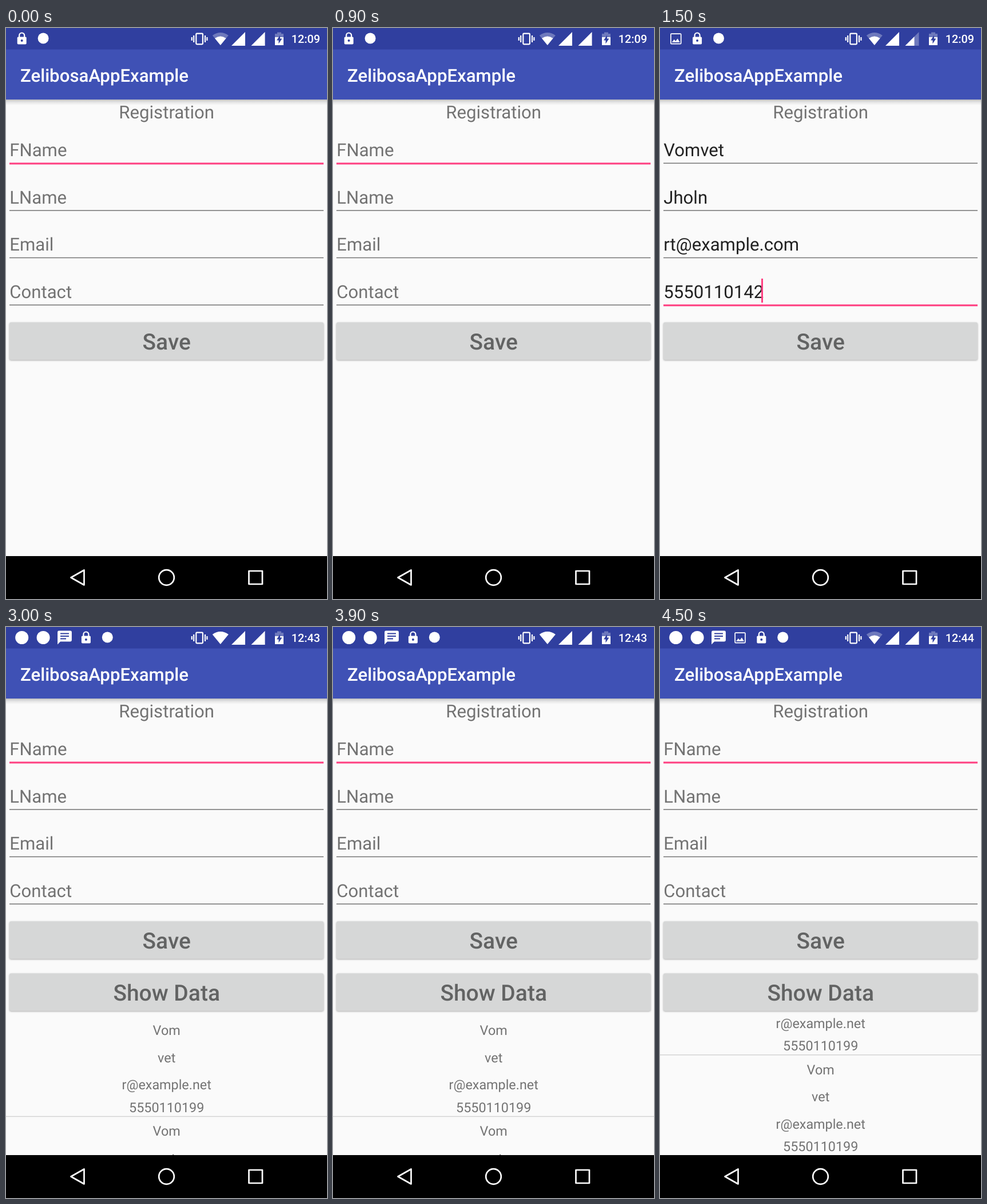
Animation of 561x998 px, one loop 6000 ms. Source, as an HTML page:

```html
<!DOCTYPE html>
<html lang="en">
<head>
<meta charset="utf-8">
<title>Registration form</title>
<style>
html, body { margin: 0; width: 100%; height: 100%; overflow: hidden; background: #fafafa; }
svg { display: block; width: 100vw; height: 100vh; }
text { font: 31.17px Roboto, sans-serif; fill: #737373; text-rendering: geometricPrecision; }
.mid { text-anchor: middle; }
.title { font-weight: 500; fill: #fff; }
.clock { font-size: 19.8px; font-weight: 500; fill: #fff; text-anchor: end; }
.button text { font-size: 38.96px; font-weight: 500; fill: #626363; text-anchor: middle; }
.button rect { fill: #d6d7d7; filter: drop-shadow(0 1.5px 1.5px rgba(0,0,0,.32)); }
.row text { font-size: 23.37px; text-anchor: middle; }
.typed { fill: #212121; }
.dim { fill: #fff; opacity: .3; }
</style>
</head>
<body>
<svg viewBox="0 0 561 998">
  <defs>
    <linearGradient id="shade" x2="0" y2="1">
      <stop offset="0" stop-opacity=".27"/>
      <stop offset=".45" stop-opacity=".1"/>
      <stop offset="1" stop-opacity="0"/>
    </linearGradient>
    <clipPath id="listArea"><path d="M0 677H561V923H0Z"/></clipPath>

    <g id="lock">
      <path d="M-4.5 17v-4a4.5 4.5 0 0 1 9 0v4" fill="none" stroke="#fff" stroke-width="2.2"/>
      <rect x="-8" y="15.5" width="16" height="13" rx="1.8" fill="#fff"/>
      <circle cy="22" r="2" fill="#303f9f"/>
    </g>
    <g id="photo">
      <rect x="-8.8" y="10.2" width="17.8" height="17.4" rx="1" fill="none" stroke="#fff" stroke-width="1.7"/>
      <path d="M-7 25l4-5 2.7 3 3.3-4.4L7 25Z" fill="#fff"/>
    </g>
    <g id="chat">
      <path d="M-10-12H10a2.4 2.4 0 0 1 2.4 2.4V4.600a2.400 2.400 0 0 1-2.400 2.400H-7.500L-12.400 12V-9.600A2.400 2.400 0 0 1-10-12Z" transform="translate(0 18.500)" fill="#fff"/>
      <path d="M-7.500 11.500H7.500M-7.500 16H7.500M-7.500 20.500H2.500" stroke="#303f9f" stroke-width="2.200"/>
    </g>
    <circle id="dot" cy="18" r="9.5" fill="#fff"/>
    <circle id="disc" cy="18.500" r="11.500" fill="#fff"/>
    <path id="fan" d="M0 0L-14-17Q0-27 14-17Z"/>
  </defs>

  <path d="M0 0H561V998H0Z" fill="#fafafa"/>
  <rect y="124" width="561" height="11" fill="url(#shade)"/>
  <path d="M0 0H561V125H0Z" fill="#3f51b5"/>
  <path d="M0 0H561V37.5H0Z" fill="#303f9f"/>
  <text class="title" x="25" y="93.700">ZelibosaAppExample</text>

  <g id="icons"></g>
  <g fill="none" stroke="#fff" stroke-width="2.2">
    <rect x="332.300" y="9.600" width="11.600" height="18.800" rx="1.300"/>
    <path d="M328.200 13V25M324.800 16V22M348 13V25M351.400 16V22"/>
  </g>
  <g transform="translate(374.800 30)">
    <use href="#fan" class="dim"/>
    <use href="#fan" id="wifi" fill="#fff"/>
  </g>
  <path d="M394 31L418 7V31Z" fill="#fff"/>
  <path class="dim" d="M428.500 31L452.500 7V31Z"/>
  <path id="signal" fill="#fff"/>
  <path class="dim" d="M470 10H474V7.500H481V10H485V16H470Z"/>
  <path d="M470 16H485V30H470Z" fill="#fff"/>
  <path d="M479 12.500L473 21.500H476.500V27.500L482.500 18.500H479Z" fill="#303f9f"/>
  <text class="clock" id="clock" x="549" y="26"></text>

  <text class="mid" x="280.700" y="158.300">Registration</text>
  <g id="fields"></g>
  <g class="button">
    <rect x="6" y="514.500" width="549" height="65.500" rx="3"/>
    <text x="280.700" y="562">Save</text>
  </g>
  <g id="data">
    <g class="button">
      <rect x="6" y="605.500" width="549" height="65.500" rx="3"/>
      <text x="280.700" y="653">Show Data</text>
    </g>
    <g clip-path="url(#listArea)"><g id="list"></g></g>
  </g>

  <path d="M0 923H561V998H0Z"/>
  <g fill="none" stroke="#fff" stroke-width="2.700" stroke-linejoin="round">
    <path d="M113.500 960.500L136.500 947.500V973.500Z"/>
    <circle cx="280.500" cy="960.500" r="13.300"/>
    <rect x="424.500" y="949" width="23.500" height="23"/>
  </g>
</svg>

<script>
const $ = id => document.getElementById(id);
const HOLD = 1500;
const PINK = '#ff4081';
const hints = ['FName', 'LName', 'Email', 'Contact'];
const typed = ['Vomvet', 'Jholn', 'rt@example.com', '5550110142'];
const record = [['Vom', 713.3], ['vet', 760.6], ['r@example.net', 808.2], ['5550110199', 848]];

const states = [
  { icons: 'lock dot', clock: '12:09' },
  { icons: 'photo lock dot', clock: '12:09', filled: true, weak: true },
  { icons: 'disc disc chat lock dot', clock: '12:43', data: true, fullWifi: true },
  { icons: 'disc disc chat photo lock dot', clock: '12:44', data: true, scroll: 107.6 }
];

function drawField(hint, i, filled) {
  const y = 82.6 * i;
  const active = i === (filled ? 3 : 0);
  const line = active
    ? `<rect x="6" y="${235.4 + y}" width="549" height="3.1" fill="${PINK}"/>`
    : `<rect x="6" y="${235.6 + y}" width="549" height="1.5" fill="#737373"/>`;
  const cursor = filled && active
    ? `<rect x="177" y="438" width="3" height="42" fill="${PINK}"/>` : '';
  return `<text x="6.2" y="${224 + y}" class="${filled ? 'typed' : ''}">${filled ? typed[i] : hint}</text>${line}${cursor}`;
}

function show(s) {
  $('icons').innerHTML = s.icons.split(' ')
    .map((id, i) => `<use href="#${id}" x="${27.7 + 37.4 * i}"/>`).join('');
  $('clock').textContent = s.clock;
  $('wifi').setAttribute('transform', `scale(${s.fullWifi ? 1 : 0.7})`);
  $('signal').setAttribute('d', s.weak ? 'M428.5 31L444.5 15V31Z' : 'M428.5 31L452.5 7V31Z');
  $('fields').innerHTML = hints.map((hint, i) => drawField(hint, i, s.filled)).join('');
  $('data').style.display = s.data ? '' : 'none';
  $('list').setAttribute('transform', `translate(0 ${-(s.scroll || 0)})`);
}

const row = record.map(([t, y]) => `<text x="280.7" y="${y}">${t}</text>`).join('') +
  '<rect y="854.8" width="561" height="1.4" fill="#d2d2d2"/>';
$('list').innerHTML = [0, 1]
  .map(i => `<g class="row" transform="translate(0 ${176 * i})">${row}</g>`).join('');

let current = -1;
function tick() {
  const next = Math.floor(performance.now() / HOLD) % states.length;
  if (next !== current) show(states[current = next]);
  requestAnimationFrame(tick);
}
tick();
</script>
</body>
</html>
```
